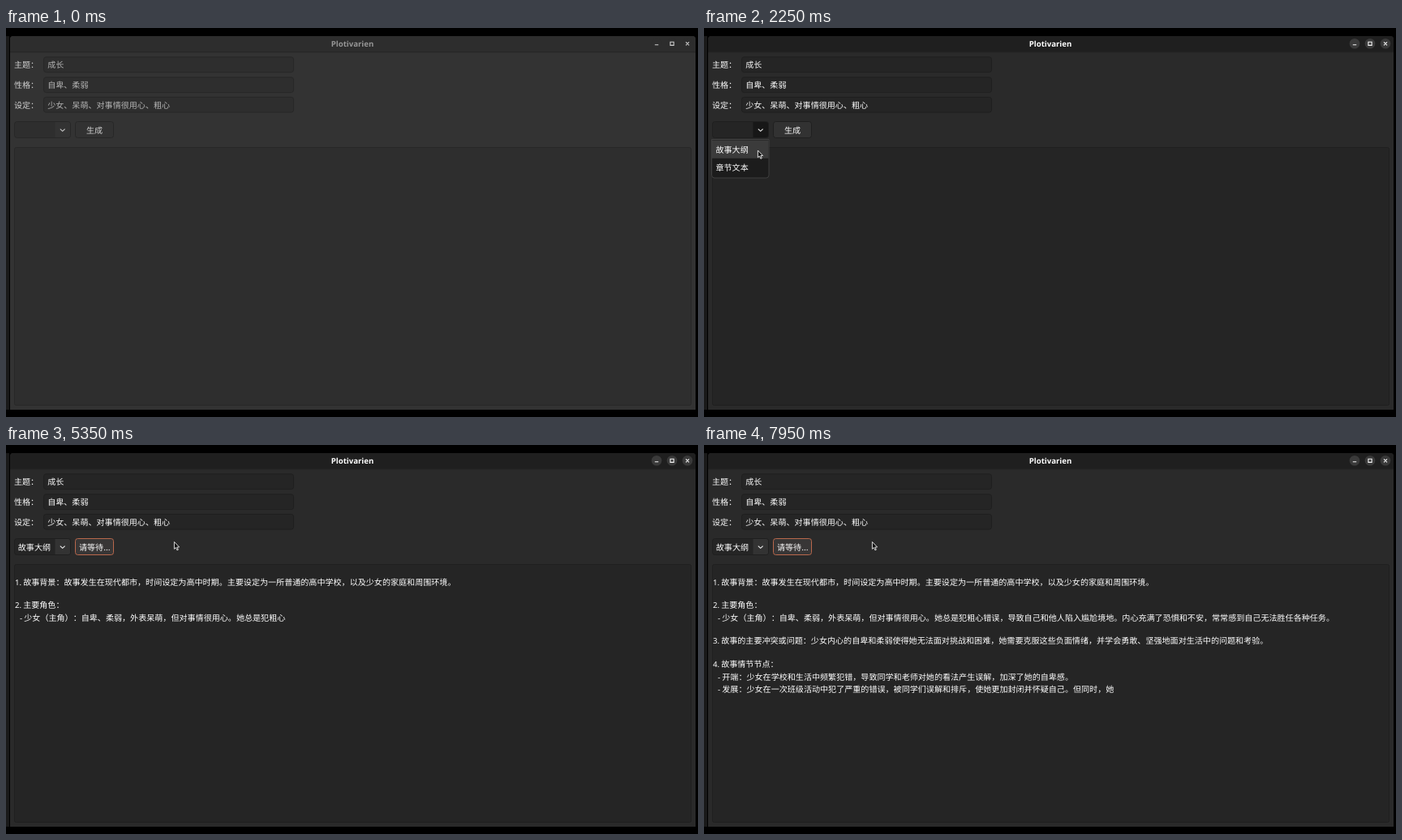
These frames come from a looping animation (853 px wide and 480 px high, 8000 ms). An HTML page:

```html
<!DOCTYPE html>
<html lang="zh-CN">
<head>
<meta charset="utf-8">
<title>Plotivarien</title>
<style>
  html, body { margin: 0; width: 100%; height: 100%; overflow: hidden; background: #000; }
  svg { display: block; width: 100vw; height: 100vh; }
  text {
    font: 10.07px "Noto Sans CJK SC", "Noto Sans CJK", sans-serif;
    font-kerning: none;
    text-spacing-trim: space-all;
    text-rendering: geometricPrecision;
    white-space: pre;
    fill: #fff;
  }
  .label { fill: var(--label); }
  .value { fill: var(--value); }
  .title { font: bold 9.6px "Open Sans", "Noto Sans", sans-serif; fill: var(--title); text-anchor: middle; }
  .latin { font-family: "Noto Sans", "Open Sans", sans-serif; font-size: 9.6px; }
  .window { fill: var(--window); }
  .bar { fill: var(--bar); }
  .field { fill: var(--field); stroke: var(--edge); }
  .button { fill: var(--button); stroke: var(--edge); }
  .round { fill: var(--round); }
  .icon { fill: none; stroke: var(--icon); stroke-width: 1.1; }
</style>
</head>
<body>
<svg id="stage" viewBox="0 0 853 480"></svg>
<script>
const LOOP = 8000, STEP = 50;
const stage = document.getElementById("stage");

function add(tag, attrs, content = "") {
  const node = document.createElementNS("http://www.w3.org/2000/svg", tag);
  for (const key in attrs) node.setAttribute(key, attrs[key]);
  node.textContent = content;
  (add.parent || stage).append(node);
  return node;
}
const rect = (cls, x, y, width, height, rx = 0, more = {}) =>
  add("rect", { class: cls, x, y, width, height, rx, ...more });
// y is the vertical middle of the characters
const label = (x, y, content, cls = "") => add("text", { class: cls, x, y: y + 3.8 }, content);
const path = (d, cls, more = {}) => add("path", { d, class: cls, ...more });
const show = (node, on) => node.setAttribute("visibility", on ? "visible" : "hidden");
function group(build) {
  const node = add("g", {});
  add.parent = node;
  build();
  add.parent = null;
  return node;
}

// window frame
rect("", 0, 10, 4, 461, 0, { fill: "#191919" });
path("M5 471V14q0-4 4-4H846q4 0 4 4V471Z", "window");
path("M5 29.5V14q0-4 4-4H846q4 0 4 4V29.5Z", "bar");
rect("", 5, 29.5, 845, 0.7, 0, { fill: "#202020" });
add("text", { class: "title", x: 427, y: 22.6 }, "Plotivarien");
for (const cx of [802, 821, 840]) add("circle", { class: "round", cx, cy: 19.3, r: 6.3 });
path("M799.8 20.8h4.4M818.9 17.2h4.2v4.2h-4.2zM838 17.3l4 4m0-4l-4 4", "icon");

// form
[
  [45.3, "主题:", "成长"],
  [70.3, "性格:", "自卑、柔弱"],
  [94.8, "设定:", "少女、呆萌、对事情很用心、粗心"]
].forEach(([y, name, value]) => {
  label(10, y, name.replace(":", "\uff1a"), "label");
  rect("field", 46.5, y - 9.5, 308, 18.8, 3);
  label(51.2, y, value, "value");
});
rect("field", 10.5, 115.5, 69, 20, 3);
const arrowBox = path("M60.5 116H76.5q2.5 0 2.5 2.5V132.5q0 2.5-2.5 2.5H60.5Z", "");
path("M66.8 124.6l2.9 2.7 2.9-2.7", "icon");
const choice = label(14.8, 126, "故事大纲");
const button = rect("button", 85.5, 115.5, 47, 20, 3);
const caption = label(99, 126, "生成", "label");
rect("field", 10.5, 147.5, 834, 318, 2);

// streamed answer: middle y, prefix, prefix x, body
const answer = [
  [169, "1. ", 11, "故事背景:故事发生在现代都市,时间设定为高中时期。主要设定为一所普通的高中学校,以及少女的家庭和周围环境。"],
  [197.5, "2. ", 11, "主要角色:"],
  [213, "- ", 17, "少女(主角):自卑、柔弱,外表呆萌,但对事情很用心。她总是犯粗心错误,导致自己和他人陷入尴尬境地。内心充满了恐惧和不安,常常感到自己无法胜任各种任务。"],
  [241.5, "3. ", 11, "故事的主要冲突或问题:少女内心的自卑和柔弱使得她无法面对挑战和困难,她需要克服这些负面情绪,并学会勇敢、坚强地面对生活中的问题和考验。"],
  [270, "4. ", 11, "故事情节节点:"],
  [286, "- ", 17, "开端:少女在学校和生活中频繁犯错,导致同学和老师对她的看法产生误解,加深了她的自卑感。"],
  [301.5, "- ", 17, "发展:少女在一次班级活动中犯了严重的错误,被同学们误解和排斥,使她更加封闭并怀疑自己。但同时,她"]
].map(([y, prefix, x, body]) => ({
  prefix,
  body: body.replace(/[,:()]/g, c => String.fromCharCode(c.charCodeAt(0) + 0xfee0)),
  head: label(x, y, "", "latin"),
  tail: label(x === 11 ? 21.2 : 22.3, y, "")
}));

const popup = group(() => {
  path("M9.5 137.5H80V181.5q0 3.5-3.5 3.5H13q-3.5 0-3.5-3.5Z", "", { fill: "#1c1c1c", stroke: "#484848", "stroke-width": 0.8 });
  rect("", 10, 138.5, 69.6, 22.3, 0, { fill: "#3b3b3b" });
  label(14.5, 150, "故事大纲");
  label(14.5, 172.3, "章节文本");
});

const beam = group(() => {
  const d = "M-2.4-4.5H2.4M0-4.5V4.5M-2.4 4.5H2.4";
  path(d, "", { stroke: "#111", "stroke-width": 3 });
  path(d, "", { stroke: "#fff", "stroke-width": 1.5 });
});
const arrow = group(() => path("M.4.5V9.3L2.4 7.5 3.9 10.8 5.3 10.2 3.9 7H6.6Z", "",
  { fill: "#111", stroke: "#eee", "stroke-width": 0.9, "stroke-linejoin": "round" }));

// motion tables: time, then values
const pointer = [
  [350, 679, 354], [450, 450, 275], [550, 260, 220], [650, 150, 182], [750, 118, 172],
  [950, 110, 158], [1150, 98, 137], [1700, 75, 125], [1950, 75, 125], [2250, 66, 150.5],
  [2400, 66, 150.5], [2800, 118, 122], [3050, 118, 122], [3500, 207, 119]
];
const typed = [
  [3900, 0], [4750, 64], [5350, 98], [5600, 113], [6400, 172], [6700, 198],
  [7000, 198], [7350, 253], [7550, 253], [7950, 316]
];
// gray levels without and with window focus
const grays = {
  window: [51, 42], bar: [45, 31], field: [46, 37], edge: [39, 31], button: [50, 50],
  round: [45, 58], icon: [205, 245], label: [208, 250], value: [180, 250], title: [150, 255]
};

function sample(table, t) {
  let i = table.findIndex(row => row[0] > t);
  if (i < 0) return table.at(-1).slice(1);
  if (i === 0) return table[0].slice(1);
  const a = table[i - 1], b = table[i], k = (t - a[0]) / (b[0] - a[0]);
  return a.slice(1).map((v, j) => v + (b[j + 1] - v) * k);
}

function type(count) {
  for (const line of answer) {
    line.head.textContent = line.prefix.slice(0, Math.max(0, count));
    line.tail.textContent = line.body.slice(0, Math.max(0, count - line.prefix.length));
    count -= line.prefix.length + line.body.length;
  }
}

function draw(t) {
  const focus = Math.min(1, Math.max(0, (t - 1900) / 200));
  for (const name in grays) {
    const [off, on] = grays[name], g = Math.round(off + (on - off) * focus);
    stage.style.setProperty("--" + name, `rgb(${g},${g},${g})`);
  }
  const open = t >= 2000 && t < 2400, waiting = t >= 3050;
  show(popup, open);
  show(choice, t >= 2400);
  arrowBox.setAttribute("fill", open ? "#171717" : "#333");
  button.style.stroke = waiting ? "#b9684c" : "";
  button.style.fill = waiting ? "#383636" : "";
  caption.setAttribute("x", waiting ? 90 : 99);
  caption.textContent = waiting ? "请等待..." : "生成";

  const [x, y] = sample(pointer, t), onText = y > 147 && t < 1200;
  for (const node of [beam, arrow]) node.setAttribute("transform", `translate(${x} ${y})`);
  show(beam, t >= 350 && onText);
  show(arrow, t >= 350 && !onText);
  type(Math.round(sample(typed, t)[0]));
}

const start = performance.now();
let last = -1;
function tick() {
  const t = Math.floor(((performance.now() - start) % LOOP) / STEP) * STEP;
  if (t !== last) draw(last = t);
  requestAnimationFrame(tick);
}
tick();
</script>
</body>
</html>
```
